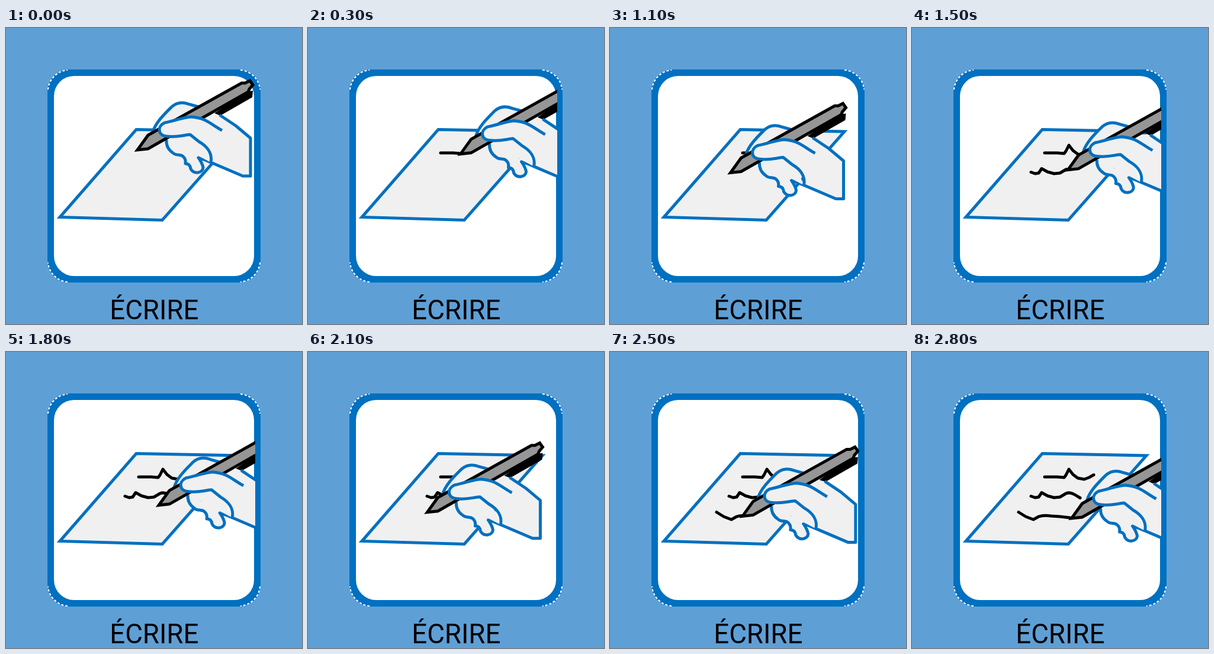
These frames come from a looping animation (500x500 px, 4900 ms). An HTML page:

```html
<!DOCTYPE html>
<html lang="fr">
<head>
<meta charset="utf-8">
<title>Écrire</title>
<style>
html, body { margin: 0; width: 100%; height: 100%; overflow: hidden; background: #5e9fd6; }
svg { display: block; width: 100%; height: 100%; }
text { font: 45.6px Roboto, Arial, sans-serif; text-anchor: middle; }
.icon { filter: blur(.7px); }
.line { fill: none; stroke: #0070c0; stroke-width: 5; }
.skin { fill: #f0f0f0; }
.edge { fill: #f0f0f0; stroke: #0070c0; stroke-width: 5; stroke-linejoin: round; }
.ink { fill: none; stroke: #000; stroke-width: 5; stroke-linecap: round; stroke-linejoin: round; }
.fringe { fill: none; stroke: #fff; stroke-width: 2; stroke-dasharray: 4 3; }
</style>
</head>
<body>
<svg viewBox="0 0 500 500">
  <clipPath id="card"><rect x="81" y="81" width="340" height="338"/></clipPath>

  <g class="icon">
    <rect x="70" y="70" width="360" height="360" rx="37" fill="#0070c0"/>
    <rect x="81" y="81" width="338" height="338" rx="34" fill="#fff"/>
    <path class="fringe" d="M71 104A36 36 0 0 1 104 71M396 71A36 36 0 0 1 429 104M429 396A36 36 0 0 1 396 429M104 429A36 36 0 0 1 71 396"/>

    <path class="edge" style="stroke-linejoin:miter" d="M220 171.500L396 175L264 324.500L91 319.500Z"/>

    <path class="ink" d="M224 211H245L257 212L260 208L265 198L272 207L280 213L291 215L299 212L307 207.500"/>
    <path class="ink" d="M201 243.500L208 246L214 245L219 237.500L229 243L240 246L250 245L260 239Q267 236 275 241L284 246.500"/>
    <path class="ink" d="M180 270.500L192 278L205 283L214 278Q222 275 235 277L250 278L267 280"/>

    <g clip-path="url(#card)">
      <g id="hand">
        <path class="skin" d="M248 176C252 160 269 144 280 133Q293 122 310 129L328 134L300 165Z"/>
        <path class="line" d="M248 176C252 160 269 144 280 133Q293 122 310 129L328 134"/>
        <path class="edge" d="M271 188C270 200 276 207 282 211C287 217 296 211 301 219Q304 223 303 229Q311 229 312 238C318 248 332 245 333 236Q332 229 325 219Q335 222 346 227"/>
        <path class="skin" d="M271 188L346 227L330 190L313 150L335 146L362 146L365 173L313 150L280 170Z"/>
        <path d="M352 144L408 107L417 106L416 117L362 148Z"/>
        <path d="M222 206L240 181L398 93L404 93L412 89L417 96L411 103L409 108L268 188L240 204Z" fill="#969696" stroke="#000" stroke-width="5"/>
        <path class="edge" d="M361 147L388 165L413 186V250H400L346 227C349 212 340 200 326 192L311 180C298 181 290 185 272 183C256 182 255 166 268 160C288 156 298 151 313 150C338 152 345 162 365 173"/>
      </g>
    </g>
  </g>

  <text x="250.300" y="492">ÉCRIRE</text>
</svg>
<script>
const LOOP = 4900, STEP = 100, LAST = 28;
const NIB = { x: 219.5, y: 205 };

// steps at which each row is started and finished
const times = [[.5, 8.5], [11, 16.5], [22, LAST]];
const hand = document.getElementById("hand");
const rows = [...document.querySelectorAll(".ink")].map((path, i) => {
  const [from, to] = times[i];
  const length = path.getTotalLength();
  const pointAt = p => path.getPointAtLength(length * p);
  return { path, from, to, length, pointAt };
});

const progress = (t, a, b) => Math.min(1, Math.max(0, (t - a) / (b - a)));
const mix = (a, b, p) => a + (b - a) * p;
const easeOut = p => 1 - (1 - p) ** 2;

// nib follows the row being written, or travels to the next one
function nibAt(step) {
  const i = rows.findLastIndex(row => step >= row.from);
  if (i < 0) return NIB;
  const row = rows[i], next = rows[i + 1];
  if (step <= row.to || !next) return row.pointAt(progress(step, row.from, row.to));
  const a = row.pointAt(1), b = next.pointAt(0);
  const p = progress(step, row.to, next.from);
  return { x: mix(a.x, b.x, p), y: mix(a.y, b.y, easeOut(p)) };
}

function draw(ms) {
  const step = Math.min(Math.floor(ms % LOOP / STEP), LAST);
  const nib = nibAt(step);
  hand.setAttribute("transform", `translate(${nib.x - NIB.x} ${nib.y - NIB.y})`);
  for (const { path, from, to, length } of rows) {
    const p = progress(step, from, to);
    path.style.visibility = p ? "visible" : "hidden";
    path.style.strokeDasharray = `${length * p} ${length + 9}`;
  }
}

const start = performance.now();
function tick(now) {
  draw(Math.max(0, now - start));
  requestAnimationFrame(tick);
}
draw(0);
requestAnimationFrame(tick);
</script>
</body>
</html>
```
